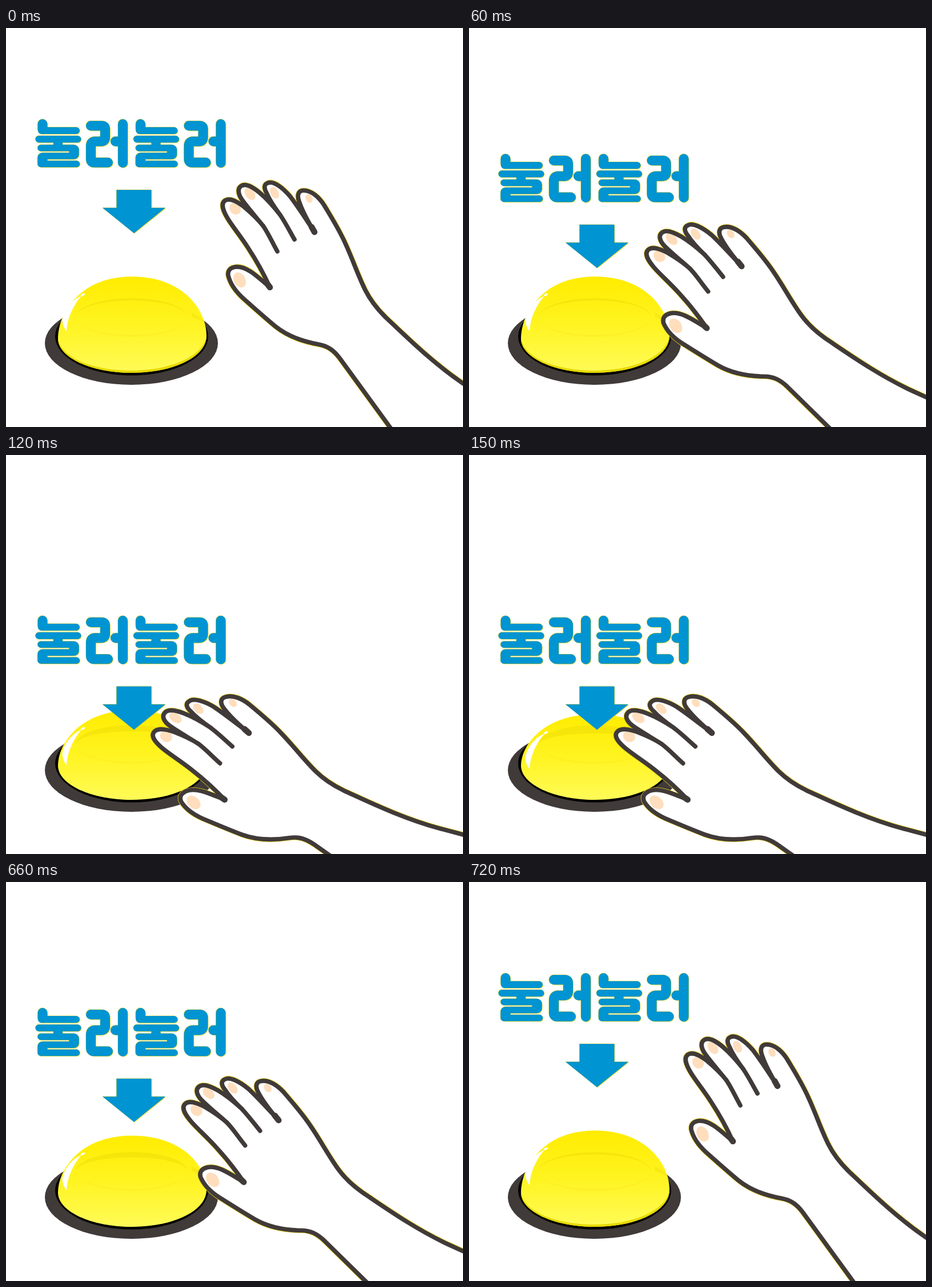
An HTML page for the animation above (2010 ms loop, 800 by 700 pixels).

```html
<!DOCTYPE html>
<html lang="ko">
<head>
<meta charset="utf-8">
<title>눌러눌러</title>
<style>
  html, body { margin: 0; width: 100%; height: 100%; overflow: hidden; background: #fff; }
  svg { display: block; width: 100vw; height: 100vh; }
</style>
</head>
<body>
<svg viewBox="0 0 800 700" role="img" aria-label="눌러눌러">
  <defs>
    <linearGradient id="yellow" x1="0" y1="0" x2="0" y2="1">
      <stop offset="0" stop-color="#ffec00"/>
      <stop offset=".5" stop-color="#fff421"/>
      <stop offset="1" stop-color="#fffb58"/>
    </linearGradient>

    <!-- Rounded lettering: 눌 uses flat 12px bars, 러 uses 17px strokes -->
    <g id="word" fill="none" stroke="currentColor" stroke-linecap="round" stroke-linejoin="round">
      <path stroke-width="17" d="M64 168.500V177.500"/>
      <path stroke-width="12" d="M62 180H123M57.500 195H125.500"/>
      <path stroke-width="16" stroke-linecap="butt" d="M91 195V212"/>
      <path stroke-width="11.500" d="M61 210.500H118Q122 210.500 122 214V221Q122 224.500 118 224.500H65Q61 224.500 61 228V238.500H123.500"/>
      <path stroke-width="11" d="M116 213V222M67 227V237"/>
      <path stroke-width="17" d="M148.500 171.500H168Q173.500 171.500 173.500 177V192Q173.500 199 166 199H156Q148.500 199 148.500 207V230Q148.500 236 154 236H178.500"/>
      <path stroke-width="17" d="M204.500 168.500V236.500M191.500 199H204"/>
    </g>
    <g id="sign">
      <use href="#word"/>
      <use href="#word" x="171.500"/>
      <path fill="currentColor" d="M193.500 284H254.500V315.500H279L224 360L169 315.500H193.500Z"/>
    </g>

    <path id="outline" d="M762 824L584 579C574 566 564 558 547 555C519 550 492 540 471 523
      C452 507 434 491 415 474C402 462 392 447 389 434C388 426 392 420 403 419C421 418 438 434 462 455
      C453 435 441 412 424 386C410 364 397 349 388 334C381 322 375 309 383 303C392 297 405 305 417 314
      C430 325 440 334 450 347C438 332 423 315 413 301C406 291 405 281 412 277C420 272 432 279 444 289
      C457 300 470 315 480 328C471 316 461 301 456 289C451 280 452 274 458 272C468 267 485 281 497 295
      C513 316 526 337 540 358C529 340 518 319 513 304C509 293 512 285 521 285C535 285 548 297 557 311
      C567 328 583 353 594 378C607 406 616 434 629 460C638 478 648 491 664 507C699 540 745 586 800 623.500L880 677"/>
  </defs>

  <rect width="800" height="700" fill="#fff"/>

  <ellipse cx="219.500" cy="553" rx="151.500" ry="73" fill="#403a39"/>
  <ellipse cx="220" cy="541" rx="134" ry="68.500"/>
  <path id="dome" fill="url(#yellow)"/>
  <path id="ring" fill="#e2d000" opacity=".32"/>
  <path d="M122 508A98 34 0 0 0 318 508A98 30 0 0 1 122 508Z" fill="#e2d000" opacity=".1"/>
  <path d="M325 499L343 509L346 516L326 507Z" fill="#e2d000" opacity=".25"/>
  <path id="rim" fill="#e6d900" d="M91 545C91 578 149 605 220 605S351 578 351 540C346 575 290 601 220 601S97 578 91 545Z"/>
  <g id="shine" fill="#fff">
    <path d="M132 470C113 477 98.500 500 98.500 514Q100 525 106 532C107 511 116 489 132 470Z"/>
    <ellipse cx="134.500" cy="468" rx="4" ry="1.800" transform="rotate(-25 134.500 468)"/>
  </g>

  <g id="label">
    <g color="#ecd61a">
      <use href="#sign" x="-.5" y="-.4"/>
      <use href="#sign" x=".8" y=".8"/>
    </g>
    <use href="#sign" color="#0094d2"/>
  </g>

  <g id="hand" stroke-linecap="round" stroke-linejoin="round">
    <use href="#outline" fill="none" stroke="#e6cc14" stroke-width="9.200"/>
    <use href="#outline" fill="#fff"/>
    <g id="nails" fill="#ffdebd"></g>
    <g fill="none" stroke="#403a39" stroke-width="7.600">
      <use href="#outline"/>
      <path d="M450 347C458 358 466 376 475 392M480 328C490 343 497 357 505 371"/>
      <path stroke-width="10.500" d="M535 349L540 358M459 451L462 455"/>
    </g>
  </g>
</svg>
<script>
  const TICK = 30, LOOP = 2010;
  const REST_TOP = 436;
  const PIVOT = '872 768', SWING = -18.9;
  const part = id => document.getElementById(id);
  const set = (id, name, value) => part(id).setAttribute(name, value);

  // x, y, rx, ry, tilt
  const nails = [
    [401, 317, 9.5, 11, -40], [427, 291, 8, 12, -35], [470, 289, 7, 11, -28],
    [530.5, 299, 6, 8, -25], [409, 442, 10, 14, -28]
  ];
  part('nails').innerHTML = nails.map(([x, y, rx, ry, tilt]) =>
    `<ellipse cx="${x}" cy="${y}" rx="${rx}" ry="${ry}" transform="rotate(${tilt} ${x} ${y})"/>`).join('');

  // Steps of lowering, 0 (raised) to 4 (pressing)
  const loweredSteps = tick => Math.max(0, Math.min(tick, 4, 24 - tick));
  const smooth = p => p * p * (3 - 2 * p);

  function domeTop(tick) {
    if (tick > 4 && tick < 21) return 455;
    return { 4: 448, 21: 448, 22: 445, 23: 440 }[tick] || REST_TOP;
  }

  function drawButton(top) {
    const drop = top - REST_TOP;
    const shoulder = drop / 2;
    const band = 4 + drop * 0.55;
    set('dome', 'd', `M91 545C91 ${500 + shoulder} 130 ${top} 220 ${top}
      C310 ${top} 351 ${495 + shoulder} 351 540C351 578 291 605 220 605S91 578 91 545Z`);
    set('ring', 'd', `M122 508A98 34 0 0 1 318 508A98 ${34 - band} 0 0 0 122 508Z`);
    set('rim', 'visibility', drop ? 'hidden' : 'visible');
    set('shine', 'transform', `translate(0 ${drop})`);
  }

  function draw(time) {
    const tick = Math.floor((time % LOOP) / TICK);
    const steps = loweredSteps(tick);
    set('label', 'transform', `translate(0 ${Math.floor(30.5 * steps)})`);
    set('hand', 'transform', `rotate(${SWING * smooth(steps / 4)} ${PIVOT})`);
    drawButton(domeTop(tick));
  }

  const start = performance.now();
  function loop() {
    draw(performance.now() - start);
    requestAnimationFrame(loop);
  }
  loop();
</script>
</body>
</html>
```
